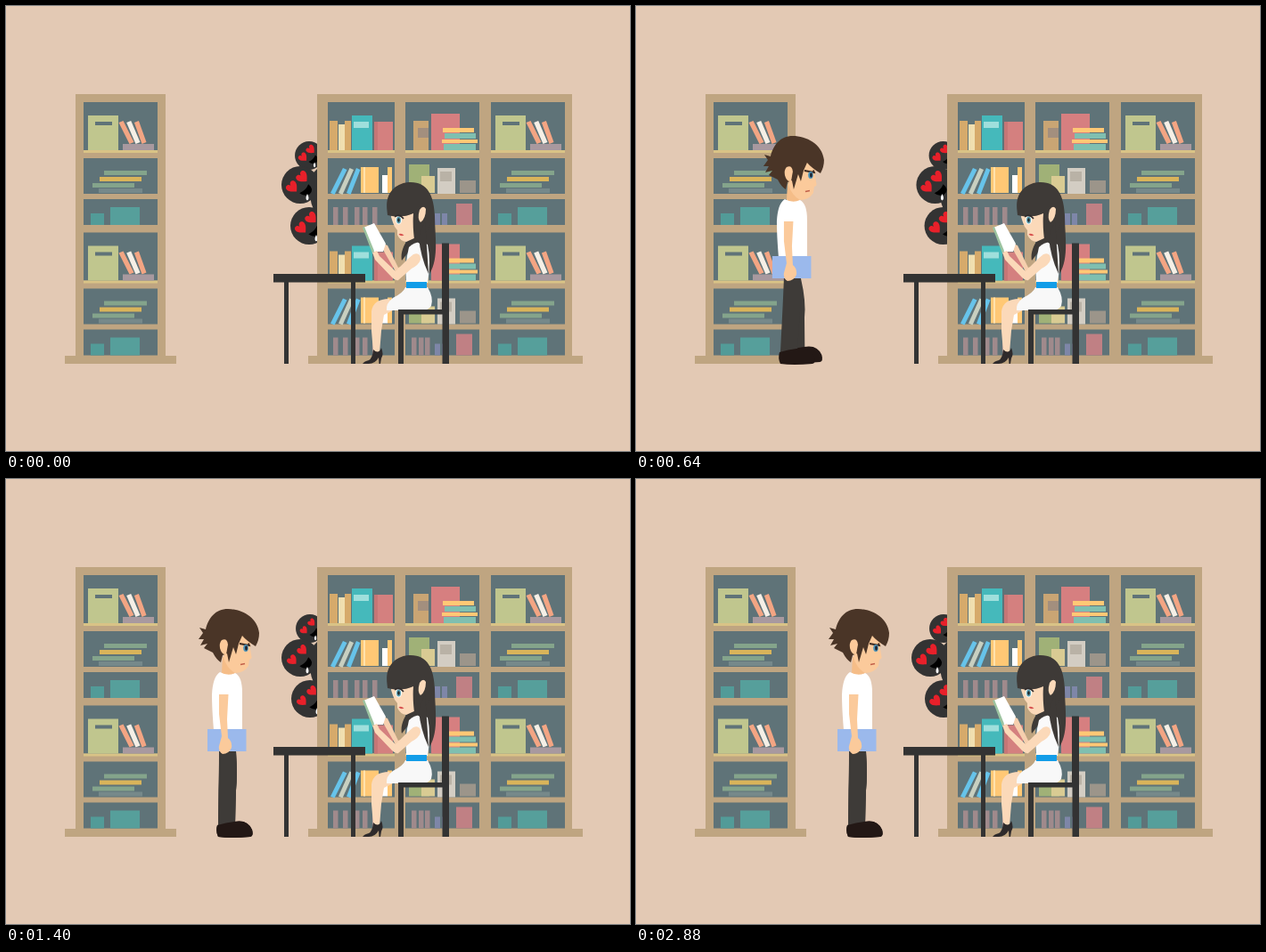
Animation, 700 px wide and 500 px high, one loop 2920 ms. Source, as an HTML page:

```html
<!DOCTYPE html>
<html lang="en">
<head>
<meta charset="utf-8">
<title>Library</title>
<style>
  html, body { margin: 0; width: 100%; height: 100%; overflow: hidden; background: #e3c9b4; }
  svg { display: block; width: 700px; height: 500px; }
</style>
</head>
<body>
<svg viewBox="0 0 700 500">
  <defs>
    <path id="heart" d="M0 6.5C-4 3-7.2 0-6.4-3.6C-5.4-7-1-7 0-3C1-7 5.4-7 6.4-3.6C7.2 0 4 3 0 6.5Z" fill="#e8202a"/>
  </defs>

  <g id="faces">
    <path d="M349 183Q340 190 341 206Q340 222 349 236Z" fill="#333"/>
  </g>
  <g id="shelves"></g>

  <g id="woman">
    <path d="M428 231C424 212 436 198 454 198C473 198 480 213 481 236C481 258 486 283 475 301L469 270L458 268L444 286C442 277 447 266 453 260Z" fill="#3e3a37"/>
    <path d="M430 329Q412 329 410 343L410 365L412 389L419 390L421 365L424 347L436 341Z" fill="#fbd9b9"/>
    <path d="M412 386Q418 392 421 384Q424 391 421 396L420 402H418.500L418 395Q414 402 407 402H400Q402 399 407 398Q411 396 412 386Z" fill="#2e2a2b"/>
    <path d="M452 271Q462 262 473 268Q477 287 473 311H449Q447 291 452 271Z" fill="#fafafa"/>
    <path d="M448 316H473Q480 328 477 337Q474 342 466 342H427Q426 334 434 328Q446 322 448 316Z" fill="#f8f8f8"/>
    <rect x="449" y="310" width="23" height="7" fill="#139de8"/>
    <path d="M450 290L440 294L428 269L423 267L423 274L438 300Z" fill="#f6cfae"/>
    <path d="M401 249L413 244L426 267L423 276L411 276Z" fill="#fff"/>
    <path d="M400 249L402 248L413 275L411 278Z" fill="#9cc3a0"/>
    <path d="M457 279Q465 276 465 285Q463 291 455 295L440 308Q437 309 433 305L414 285L411 277L416 275L419 281L437 298L450 285Z" fill="#fbd9b9"/>
    <path d="M434 227L432 237Q434 244 436 248L439 252L439 257Q442 264 449 265L460 260L466 228Z" fill="#fbd9b9"/>
    <path d="M428 235C425 214 436 199 454 199C471 199 479 212 480 233L476 246L464 267L458 262Q456 247 457 233Q444 239 428 235Z" fill="#3e3a37"/>
    <path d="M464 229Q468 223 471 228Q471 239 465 243Q461 239 464 229Z" fill="#fbd9b9"/>
    <path d="M470 241Q472 268 474 301Q465 282 463 260Z" fill="#3e3a37"/>
    <ellipse cx="440.500" cy="240.500" rx="3.500" ry="5" fill="#fff"/>
    <ellipse cx="440.500" cy="240.500" rx="2.500" ry="4" fill="#5b9eb0"/>
    <ellipse cx="440.500" cy="240.500" rx="1.200" ry="2.200" fill="#222"/>
    <path d="M436 237Q441 233 446 239" fill="none" stroke="#2e2a2b" stroke-width="1.500"/>
    <path d="M440.500 256.500Q443 254.500 446.500 257.500Q443 259.500 440.500 256.500Z" fill="#d8524f"/>
  </g>

  <g fill="#333">
    <path d="M300 301H403V310.500H392V402H387V310.500H317V402H312V310.500H300Z"/>
    <path d="M489 266.500H497V402H489.500V346.500H446V402H440V341H489Z"/>
  </g>

  <g id="man">
    <path class="leg" fill="#3e3b38"/><path class="shoe" fill="#231815"/>
    <path class="leg" fill="#3e3b38"/><path class="shoe" fill="#231815"/>
    <path d="M243 200H256L257 218Q250 225 242 218Z" fill="#f5bd88"/>
    <path d="M240 217Q249 222 257 218Q265 222 265 240V282H233Q231 258 231 242Q232 222 240 217Z" fill="#fff"/>
    <path d="M226 281H269.500V306H226Z" fill="#9bb9ec"/>
    <path d="M239 242H249.500L248 270L249 291Q254 295 253 302Q250 309 243 309Q238 306 239 300L242 289L239 264Z" fill="#fbca9b"/>
    <path d="M246 176H275L274 191L275.500 200Q276 202 273 203L272 210Q267 218 257 218Q248 213 244 201Z" fill="#fbca9b"/>
    <path d="M224 169L217 167L221 173L216 180H222L218 187L226 185L222 190L232 195Q236 203 241 206L243 198L248 196L250 206L255 189L258 197L261 185L265 176Q270 182 280 188Q284 181 284 173C282 155 264 146 249 146C235 146 227 156 224 169Z" fill="#4a3527"/>
    <path d="M242 181Q248 178 249 186L247 197Q242 198 240 190Q239 184 242 181Z" fill="#fbca9b"/>
    <path d="M262 185L273 187L272 184.500" fill="none" stroke="#3a281f" stroke-width="1.800"/>
    <ellipse cx="269" cy="190" rx="2.800" ry="4" fill="#4d93b8"/>
    <ellipse cx="269.500" cy="190" rx="1.400" ry="2.800" fill="#1e2430"/>
    <path d="M263 208.500L268 207.500" stroke="#c2604a" stroke-width="1.500"/>
  </g>
</svg>

<script>
const LOOP = 2920, STEP = 40, BEAT = LOOP / 9;
const NS = "http://www.w3.org/2000/svg";
const $ = id => document.getElementById(id);

const add = (parent, tag, attrs) => {
  const el = document.createElementNS(NS, tag);
  for (const k in attrs) el.setAttribute(k, attrs[k]);
  return parent.appendChild(el);
};

const box = (g, fill, x1, y1, x2, y2) =>
  add(g, "rect", { x: x1, y: y1, width: x2 - x1, height: y2 - y1, fill });

// leaning book: x at top and bottom, thickness w
const lean = (g, fill, top, bottom, y1, y2, w, tilt) =>
  add(g, "path", { fill, d: `M${top} ${y1 + tilt}L${top + w} ${y1}L${bottom + w} ${y2 - tilt}L${bottom} ${y2}Z` });

const wood = "#bfa581", dark = "#5f7378", orange = "#ffc875", teal = "#7fbfb0", mauve = "#a08a8c";

function bay(g, left, right) {
  box(g, dark, left, 108, right, 162);
  box(g, "#d9c386", left, 162, right, 165);
  box(g, dark, left, 171, right, 211);
  box(g, dark, left, 217, right, 246);
}

function greenBay(g) {
  bay(g, 87, 170);
  box(g, "#c0c68e", 92, 123, 126, 162);
  box(g, dark, 100, 130, 119, 134);
  ["#f3a583", "#f5efe6", "#f3a583"].forEach((c, i) =>
    lean(g, c, 126.5 + 8.7 * i, 138.5 + 7 * i, 129, 155, 5, 2));
  box(g, "#a8999f", 131, 155, 166, 162);
  box(g, "#84a48b", 110, 185, 158, 190);
  box(g, "#d9b45a", 105, 192, 152, 197);
  box(g, "#84a48b", 97, 199, 144, 204);
  box(g, "#76898a", 104, 205, 153, 210);
  box(g, "#529b98", 95, 233, 110, 246);
  box(g, "#569f9b", 117, 226, 150, 246);
}

function tealBay(g) {
  bay(g, 361, 436);
  box(g, "#d6aa6b", 363, 129, 372, 162);
  box(g, "#f0dfb0", 373, 133, 380, 162);
  box(g, "#d6aa6b", 380, 129, 387, 162);
  box(g, "#45b9bb", 388, 123, 411, 162);
  box(g, "#9fdfdc", 390, 130, 407, 137);
  box(g, "#d4807f", 413, 130, 434, 162);
  box(g, "#c67676", 413, 130, 417, 162);
  ["#67c3ea", "#c8cfc0", "#67c3ea"].forEach((c, i) =>
    lean(g, c, 378 + 7.5 * i, 364 + 9 * i, 184, 210, 4.5, -2));
  box(g, orange, 398, 181, 418, 210);
  box(g, "#ffe2ad", 401, 181, 403, 210);
  box(g, "#fff", 422, 190, 428, 210);
  box(g, orange, 428, 181, 433, 210);
  for (const x of [367, 378, 391, 400, 411]) box(g, mauve, x, 226, x + 5.5, 246);
}

function pinkBay(g) {
  bay(g, 448, 531);
  box(g, "#c9a574", 457, 129, 474, 162);
  box(g, "#a38f7e", 462, 137, 474, 148);
  box(g, "#d67f80", 477, 121, 509, 162);
  box(g, orange, 490, 137, 525, 142);
  box(g, teal, 492, 143, 527, 149);
  box(g, orange, 489, 150, 529, 154);
  box(g, teal, 491, 155, 527, 162);
  box(g, "#a0b177", 452, 178, 475, 210);
  box(g, "#d9cb93", 466, 191, 481, 210);
  box(g, "#d3cdc3", 484, 182, 504, 211);
  box(g, "#b9b2a6", 487, 186, 500, 197);
  box(g, "#9c958a", 509, 196, 527, 210);
  for (const x of [455, 463, 470]) box(g, mauve, x, 226, x + 5.5, 246);
  for (const x of [481, 489]) box(g, "#7e86a8", x, 233, x + 6, 246);
  box(g, "#c08084", 505, 222, 523, 246);
}

const shelves = $("shelves");
function stack(draw, dx = 0) {
  for (const dy of [0, 146.5]) draw(add(shelves, "g", { transform: `translate(${dx} ${dy})` }));
}
function frame(left, right, baseLeft, baseRight) {
  box(shelves, wood, left, 99, right, 394);
  box(shelves, wood, baseLeft, 393, baseRight, 402);
}
frame(78, 179, 66, 191);
stack(greenBay);
frame(349, 635, 339, 647);
stack(tealBay);
stack(pinkBay);
stack(greenBay, 457);

// peeking faces: centre, scale, and [time, shift] keys
const slow = [[0, 0], [320, 3], [480, 5], [560, 5], [840, 3.4], [1400, 1], [1680, 0], [2240, 5], [LOOP, 5]];
const quick = [[0, 0], [320, 5], [500, 8], [560, 7.2], [840, 1], [920, 0],
  [1720, 0], [2040, 5], [2220, 8], [2280, 7.2], [2560, 1], [2640, 0], [LOOP, 0]];
const faces = [[340, 168, 0.76, slow], [340, 247, 1, slow], [330, 201, 1, quick]].map(([x, y, k, keys]) => {
  const g = add($("faces"), "g", {});
  add(g, "circle", { r: 21, fill: "#333" });
  const tilt = add(g, "g", { transform: "rotate(-45)" });
  add(tilt, "path", { d: "M-7 6Q0 9 7 6Q8 15 0 15Q-6 14-7 6Z", fill: "#000" });
  add(g, "path", { d: "M8 10Q11 16 8 17.500Q5 16 8 10Z", fill: "#fff" });
  const eyes = [-8, 8].map(ex => [ex, add(tilt, "use", { href: "#heart" })]);
  return { g, x, y, k, keys, eyes };
});

function at(keys, t) {
  const i = keys.findIndex(k => k[0] > t);
  const [t0, a] = keys[i - 1], [t1, b] = keys[i];
  return a + (b - a) * (t - t0) / (t1 - t0);
}

// steady walk, then an even slowdown to rest
const SPEED = 0.4375, SLOW_AT = 640, BRAKE = 334;
function walk(t) {
  if (t < SLOW_AT) return SPEED * (t - SLOW_AT) - SPEED * BRAKE / 2;
  const left = Math.max(0, 1 - (t - SLOW_AT) / BRAKE);
  return -SPEED * BRAKE / 2 * left * left;
}

const legs = document.querySelectorAll(".leg"), shoes = document.querySelectorAll(".shoe");
const PASS = 320, STRIDE = 302;
function poseLeg(i, swing, lift) {
  const dx = swing * (swing > 0 ? 29 : 16);
  const knee = dx * (swing > 0 ? 0.75 : 0.5), y = 389 - lift;
  const l = 238 + dx, r = 257 + dx;
  legs[i].setAttribute("d",
    `M239 306H258Q${260 + knee} 332 ${258 + knee} 350L${r} ${y}H${l}L${238.5 + knee} 350Q${239 + knee * 0.7} 332 239 306Z`);
  shoes[i].setAttribute("d",
    `M${l - 1} ${y}Q${l + 9} ${y - 3} ${r - 1} ${y - 4}Q${r + 14} ${y - 7} ${r + 19} ${y + 5}Q${r + 21} ${y + 12} ${r + 17} ${y + 13}Q${l + 14} ${y + 15} ${l} ${y + 13}Q${l - 3} ${y + 7} ${l - 1} ${y}Z`);
}

function draw(t) {
  const beat = 0.9 + 0.1 * Math.cos(2 * Math.PI * t / BEAT);
  for (const f of faces) {
    f.g.setAttribute("transform", `translate(${f.x + at(f.keys, t)} ${f.y}) scale(${f.k})`);
    for (const [ex, el] of f.eyes) el.setAttribute("transform", `translate(${ex} -4) scale(${beat})`);
  }
  $("man").setAttribute("transform", `translate(${walk(t)} 0)`);
  const phase = Math.PI * Math.min(2, (t - PASS) / STRIDE);
  const swing = Math.sin(phase), pace = t < PASS + 2 * STRIDE ? Math.cos(phase) : 0;
  poseLeg(0, -swing, Math.max(0, -pace) * 2);
  poseLeg(1, swing, Math.max(0, pace) * 2);
}

const start = performance.now();
function tick() {
  const t = (performance.now() - start) % LOOP;
  draw(Math.floor(t / STEP) * STEP);
  requestAnimationFrame(tick);
}
tick();
</script>
</body>
</html>
```
